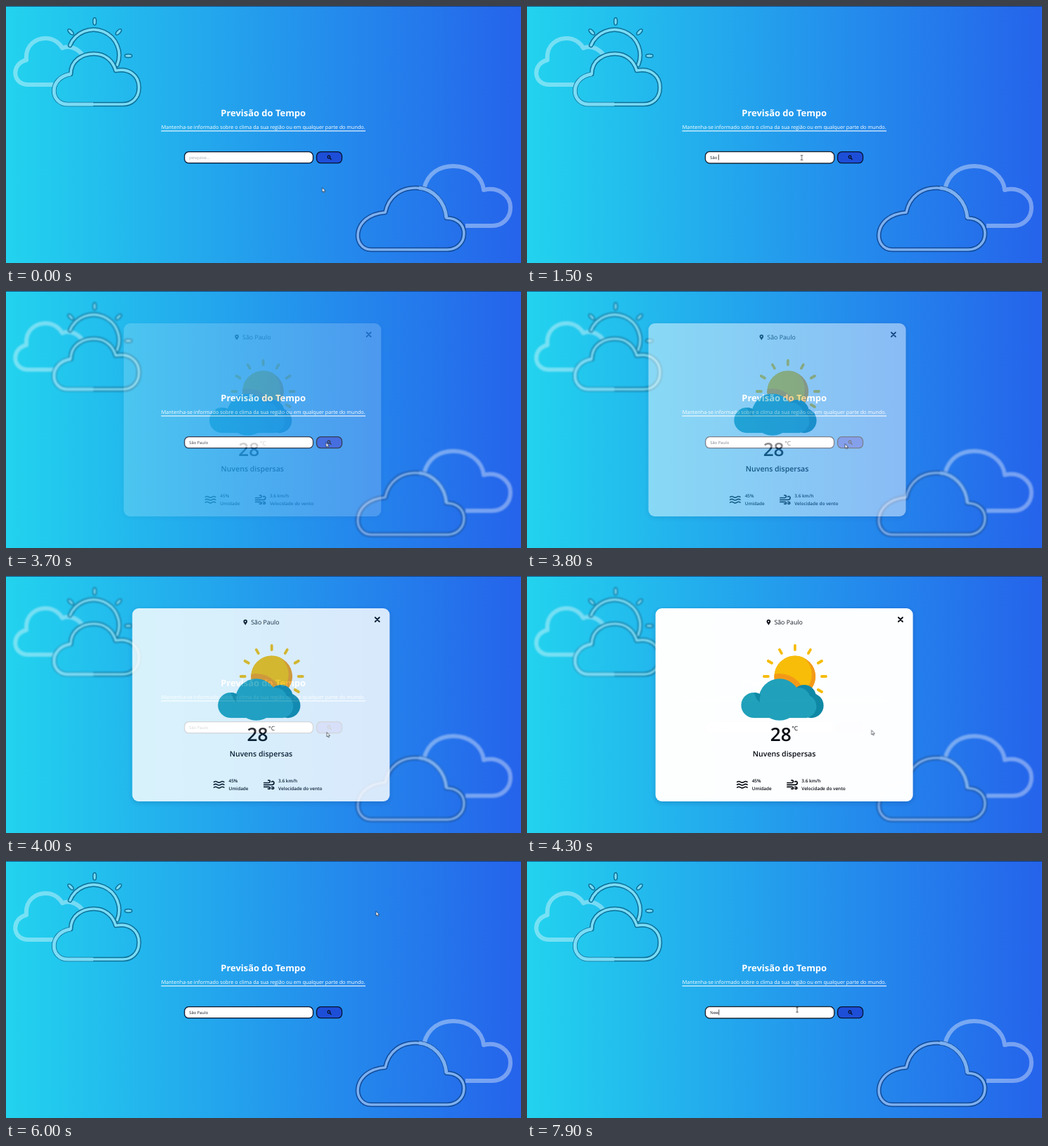
Recreate the animation shown at these times as an HTML page. Size 732 by 366 pixels, loop 8 s.

```html
<!DOCTYPE html>
<html lang="pt-BR">
<head>
<meta charset="utf-8">
<title>Previsão do Tempo</title>
<style>
  html, body { margin: 0; width: 100%; height: 100%; overflow: hidden; background: #2498ec; }
  svg { display: block; width: 100vw; height: 100vh; font-family: "Open Sans", "Noto Sans", sans-serif; text-rendering: geometricPrecision; }
  path, line { fill: none; stroke-linecap: round; stroke-linejoin: round; }
  text { white-space: pre; }

  .back { stroke: #fff; stroke-opacity: .38; stroke-width: 6; }
  .edge { stroke-width: 6.6; }
  .core { stroke-width: 3.6; }
  .morning { --edge: #0d7097; --core: #7adcf6; }
  .evening { --edge: #124b99; --core: #7cb0f1; }
  .edge { stroke: var(--edge); }
  .core, .plain { stroke: var(--core); }
  .plain { stroke-width: 5; stroke-linecap: butt; }
  .ray { fill: var(--core); stroke: var(--edge); stroke-width: 1.5; }

  .ink { stroke: #05080f; }
  .bold { font-weight: 600; }

  #clouds, #modal, #ring, #mouse, #arrow, #beam { animation: 8s infinite; }
  #clouds { animation-name: blur; animation-timing-function: step-end; }
  #modal { animation-name: enter; }
  #ring { animation-name: focus; animation-timing-function: step-end; }
  #mouse { animation-name: travel; animation-timing-function: ease-in-out; }
  #arrow { animation-name: arrow; animation-timing-function: step-end; }
  #beam { animation-name: beam; animation-timing-function: step-end; }

  @keyframes blur {
    0%, 73.6% { filter: none; }
    44.7% { filter: blur(1.1px); }
  }
  @keyframes enter {
    0% { opacity: 0; transform: translateX(-19px); animation-timing-function: step-end; }
    44.75% { opacity: 0; transform: translateX(-19px); animation-timing-function: ease; }
    54.75% { opacity: 1; transform: none; animation-timing-function: step-end; }
    73.6%, 100% { opacity: 0; transform: translateX(-19px); }
  }
  @keyframes focus {
    0%, 44% { opacity: 0; }
    10.6%, 82.5% { opacity: 1; }
  }
  @keyframes travel {
    0%, 1% { transform: translate(449.5px, 259px); }
    11%, 36% { transform: translate(390.5px, 216px); }
    37.5% { transform: translate(390.5px, 219px); }
    43.5%, 46% { transform: translate(455px, 216px); }
    47.5% { transform: translate(452px, 218px); animation-timing-function: linear; }
    50% { transform: translate(456px, 223px); }
    53.75%, 60% { transform: translate(489.7px, 220px); }
    68.75%, 73% { transform: translate(529px, 61px); }
    75% { transform: translate(526px, 72px); }
    82.5%, 100% { transform: translate(384px, 212px); }
  }
  @keyframes arrow {
    0%, 40.5% { opacity: 1; }
    10%, 82% { opacity: 0; }
  }
  @keyframes beam {
    0%, 40.5% { opacity: 0; }
    10%, 82% { opacity: 1; }
  }
</style>
</head>
<body>
<svg viewBox="0 0 732 366" preserveAspectRatio="none">
  <defs>
    <linearGradient id="sky">
      <stop stop-color="#22d3ee"/>
      <stop offset="1" stop-color="#2563eb"/>
    </linearGradient>
    <filter id="shadow" x="-5%" y="-5%" width="110%" height="112%">
      <feDropShadow dx="0" dy="2" stdDeviation="3" flood-color="#0a2a66" flood-opacity=".25"/>
    </filter>
    <clipPath id="disc"><circle cx="381" cy="143" r="29.5"/></clipPath>
    <path id="sunArc" d="M91 56A35 35 0 0 1 158 84"/>
    <path id="leftCloud" d="M124 140H88C62 140 60 102 92 97C92 77 109 68 125 68C141 68 152 78 156 92C175 88 189 99 189 116C189 132 178 140 166 140Z"/>
    <path id="rightCloud" d="M519 347C492 347 490 298 539 294C544 270 562 259 583 259C606 259 624 278 626 302C642 302 651 312 651 324C651 338 640 347 627 347Z"/>
  </defs>

  <rect width="732" height="366" fill="url(#sky)"/>
  <rect width="732" height="1" fill="#0b3268" opacity=".75"/>

  <g id="clouds">
    <g class="morning">
      <path class="back" d="M66 112H32C8 112 7 82 29 77C27 54 44 46 56 46C69 46 77 54 80 60C92 55 103 62 109 70"/>
      <use href="#sunArc" class="edge"/>
      <use href="#sunArc" class="core"/>
      <g id="rays"></g>
      <use href="#leftCloud" class="edge"/>
      <use href="#leftCloud" class="core"/>
      <path class="plain" d="M124 140H88C62 140 60 102 92 97"/>
    </g>
    <g class="evening">
      <path class="back" style="stroke-linecap:butt" d="M594 260C600 237 617 228 636 228C658 228 677 242 679 262C700 257 717 270 717 287C717 303 705 313 691 313H653"/>
      <use href="#rightCloud" class="edge"/>
      <use href="#rightCloud" class="core"/>
      <path class="plain" d="M587 259C607 261 624 278 626 302"/>
    </g>
  </g>

  <g fill="#fff" text-anchor="middle">
    <text x="365.7" y="156.7" font-size="12.95" font-weight="700">Previsão do Tempo</text>
    <text x="365.7" y="174.6" font-size="7.23">Mantenha-se informado sobre o clima da sua região ou em qualquer parte do mundo.</text>
    <rect x="220.5" y="177.4" width="290.5" height="1.1"/>
  </g>

  <rect x="253.7" y="207.7" width="182.8" height="16" rx="6" fill="#fff" stroke="#06122e" stroke-width="1.3"/>
  <g id="ring" fill="none">
    <rect x="254.2" y="208.2" width="181.8" height="15" rx="5.5" stroke="#fff" stroke-width=".7"/>
    <rect x="253.3" y="207.3" width="183.6" height="16.8" rx="6.3" stroke="#101010" stroke-width=".8"/>
  </g>
  <text id="query" x="260.3" y="218" font-size="5.85"></text>
  <rect id="caret" y="211.5" width=".7" height="8" fill="#000"/>

  <rect x="441.5" y="207.7" width="36" height="16" rx="6" fill="#1d4ed8" stroke="#06122e" stroke-width="1.3"/>
  <circle cx="458.9" cy="215" r="1.9" fill="none" stroke="#05080f" stroke-width="1.1"/>
  <line class="ink" x1="460.4" y1="216.6" x2="462" y2="218.2" stroke-width="1.3"/>

  <g id="modal">
    <rect x="182.8" y="46" width="365.8" height="275" rx="9" fill="#fff" filter="url(#shadow)"/>
    <path d="M343.5 70C342 67.6 340.7 66.4 340.7 64.8A2.8 2.8 0 0 1 346.3 64.8C346.3 66.4 345 67.6 343.5 70Z" style="fill:#05080f"/>
    <circle cx="343.5" cy="64.8" r="1" fill="#fff"/>
    <text x="351.5" y="69.2" font-size="8.8" fill="#151a22">São Paulo</text>
    <path class="ink" d="M528 59L534 65M534 59L528 65" stroke-width="1.8"/>

    <g id="beams" stroke="#f8bd0b" stroke-width="3.8"></g>
    <g clip-path="url(#disc)">
      <circle cx="381" cy="143" r="29.5" fill="#f59a16"/>
      <circle cx="375" cy="140" r="30" fill="#f9be08"/>
      <circle cx="359" cy="176" r="37" fill="#f59a16"/>
    </g>
    <g fill="#1089a5">
      <circle cx="394" cy="172" r="17"/>
      <circle cx="404" cy="184.5" r="17.7"/>
    </g>
    <g fill="#21a1ba">
      <circle cx="359" cy="176" r="29.7"/>
      <circle cx="322.5" cy="184" r="18"/>
      <circle cx="386" cy="176" r="17"/>
      <circle cx="395" cy="185.5" r="16.5"/>
      <rect x="322" y="180" width="76" height="22.1"/>
    </g>
    <path d="M323 166.2Q329 166 332 169Q330 175 331 180Q325 175 323 166.2Z" style="fill:#1089a5"/>

    <g fill="#05080f">
      <text class="bold" x="345.8" y="235.3" font-size="26.2">28</text>
      <text x="376.3" y="220.3" font-size="8.6">°C</text>
      <text class="bold" x="365.7" y="257" font-size="10.55" text-anchor="middle">Nuvens dispersas</text>
      <g class="bold" font-size="6.4">
        <text x="319.8" y="294.3">45%</text>
        <text x="319.8" y="305">Umidade</text>
        <text x="390.4" y="294.3">3.6 km/h</text>
        <text x="390.4" y="305">Velocidade do vento</text>
      </g>
    </g>
    <g id="waves" class="ink" stroke-width="1.6"></g>
    <path class="ink" stroke-width="1.7" d="M370 294.5H376.5Q379 294 378.6 292Q378 290.5 376 291M370 297.4H381.5Q384.6 297 384.2 293.8Q383 291.5 381 293M370 300.3H376.5Q379.3 300.8 378.6 302.6Q377.6 303.8 375.8 303M381 300.3Q384.5 300.6 383.8 302.6Q382.5 303.8 381 302.8"/>
  </g>

  <g id="mouse">
    <path id="arrow" d="M0 0V6L1.4 4.8L2.4 7L3.4 6.5L2.5 4.4H4.3Z" style="fill:#fff" stroke="#1b2430" stroke-width=".6"/>
    <path id="beam" d="M-1.3 -3.2H1.3M0 -3.2V3.2M-1.3 3.2H1.3" stroke="#222" stroke-width=".7"/>
  </g>
</svg>

<script>
  const LOOP = 8000;
  const CITY = "São Paulo";
  const NEXT = "New";
  const byId = id => document.getElementById(id);

  // Decorative repeats
  byId("rays").innerHTML = [[126, 22, 0], [92, 37, -45], [160, 37, 45], [174, 71, 90]]
    .map(([x, y, turn]) => `<ellipse class="ray" rx="2.4" ry="5.2" transform="translate(${x} ${y}) rotate(${turn})"/>`)
    .join("");

  byId("beams").innerHTML = Array.from({ length: 8 }, (_, i) =>
    `<line x1="38" x2="44" y1="0" y2="0" transform="translate(381 143) rotate(${30 - i * 30})"/>`).join("");

  byId("waves").innerHTML = [293.3, 297.2, 301.1]
    .map(y => `<path d="M298.8 ${y}q2.4 -1.6 4.8 0t4.8 0t4.8 0"/>`).join("");

  // Typing: [time, text, caret shown]
  const edits = [[0, "", false], [850, "", true]];
  const type = (word, times) =>
    times.forEach((time, i) => edits.push([time, word.slice(0, i + 1), true]));

  type(CITY.slice(0, 4), [1000, 1100, 1200, 1300]);
  edits.push([1500, "São ", false]);
  [1800, 1900, 2000, 2200, 2300].forEach((time, i) => edits.push([time, CITY.slice(0, 5 + i), true]));
  edits.push([2500, CITY, false], [6650, CITY, true]);
  for (let i = 1; i <= 5; i++) edits.push([6800 + i * 100, CITY.slice(0, Math.max(0, 9 - 2 * i)), true]);
  type(NEXT, [7500, 7700, 7800]);

  const query = byId("query");
  const caret = byId("caret");
  const clock = byId("modal").getAnimations()[0];
  let shown;

  function draw() {
    const time = (clock.currentTime || 0) % LOOP;
    const edit = edits.findLast(([start]) => start <= time + 1);
    if (edit !== shown) {
      shown = edit;
      const [, text, caretOn] = edit;
      query.textContent = text || "pesquise...";
      query.setAttribute("fill", text ? "#111722" : "#a3a9b3");
      caret.setAttribute("x", 260.4 + (text ? query.getComputedTextLength() : 0));
      caret.setAttribute("opacity", caretOn ? 1 : 0);
    }
    requestAnimationFrame(draw);
  }
  draw();
</script>
</body>
</html>
```
